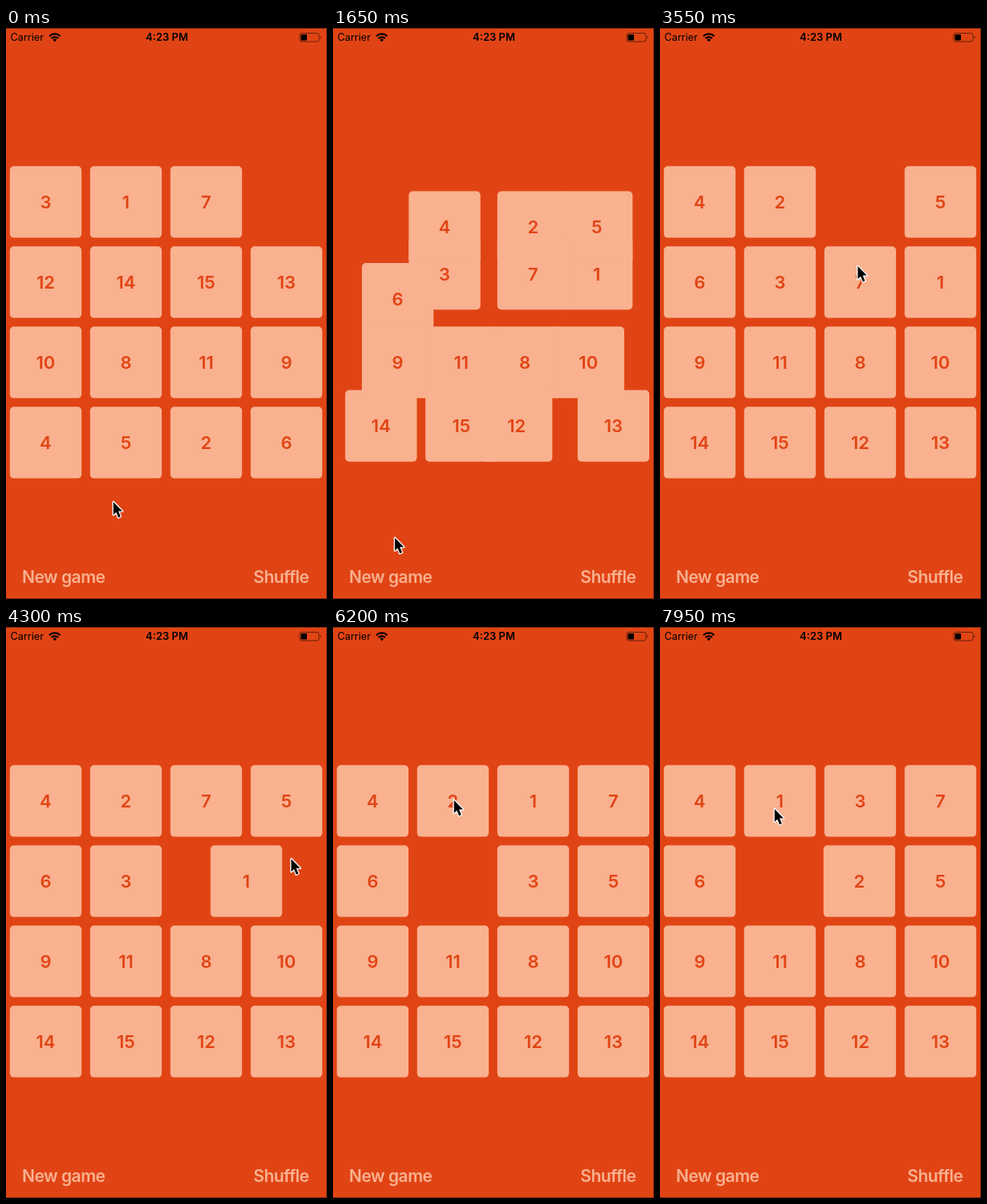
An HTML page that plays this animation: 400 by 712 pixels, repeating every 8 s.

```html
<!DOCTYPE html>
<html lang="en">
<head>
<meta charset="utf-8">
<title>Fifteen puzzle</title>
<style>
  html, body { margin: 0; width: 100%; height: 100%; overflow: hidden; background: #e14414; }
  svg { display: block; width: 100vw; height: 100vh; }
  text { font-family: Inter, Roboto, sans-serif; font-optical-sizing: none; }
  .tile rect { fill: #f9b190; }
  .tile text { font-size: 22px; font-weight: 600; fill: #e14414; text-anchor: middle; }
  .button { font-size: 21px; font-weight: 600; letter-spacing: -.5px; fill: #f9b190; }
  .status { font-size: 12.7px; }
  .clock { font-size: 13px; font-weight: 600; text-anchor: middle; }
  .end { text-anchor: end; }
</style>
</head>
<body>
<svg viewBox="0 0 400 712" preserveAspectRatio="none">
  <rect width="400" height="712" fill="#e14414"/>

  <text class="status" x="5.5" y="16.3">Carrier</text>
  <g fill="none" stroke="#000" stroke-width="2.2">
    <path d="M54 10.2a9.8 9.8 0 0 1 13.6 0"/>
    <path d="M56.6 13a6 6 0 0 1 8.4 0"/>
  </g>
  <path d="M60.8 17.2l-2.3-2.5a3.3 3.3 0 0 1 4.6 0z"/>
  <text class="clock" x="200.5" y="16.3">4:23 PM</text>
  <rect x="366" y="6.5" width="24" height="10.5" rx="2.6" fill="none" stroke="#000" stroke-opacity=".55"/>
  <rect x="367.5" y="8" width="7.5" height="7.5" rx="1"/>
  <path d="M391.5 10v3.6a2 2 0 0 0 0-3.6z" fill-opacity=".6"/>

  <g id="board"></g>

  <text class="button" id="newGame" x="20" y="692">New game</text>
  <text class="button end" x="377.5" y="692">Shuffle</text>

  <path d="M0 .5H399.5V711.5H0" fill="none" stroke="#7d2a10"/>
  <path id="cursor" d="M.8 1V17L4.3 13.7 7.1 20.4 9.8 19.1 7 12.5H12Z" stroke="#fff" stroke-width="2.6" stroke-linejoin="round" paint-order="stroke fill"/>
</svg>
<script>
const LOOP = 8000, STEP = 50, SLIDE = 250;
const PRESS = 1290, RELEASE = 1420, DEAL = 1450;
const SETTLE = 125, LINGER = 100;   // cursor rest before and after a stop
const PITCH = 100, SIZE = 89.3, LEFT = 4.8, TOP = 172.3;

// 0 is the gap
const before = "3 1 7 0 12 14 15 13 10 8 11 9 4 5 2 6".split(" ").map(Number);
const after = "0 4 2 5 6 3 7 1 9 11 8 10 14 15 12 13".split(" ").map(Number);

// [time, x, y]; a click slides the tile under it into the gap
const clicks = [
  [2700, 131, 198], [3190, 231, 208], [3700, 246, 298], [4175, 355, 291],
  [4620, 345, 215], [5050, 246, 215], [5500, 220, 291], [5870, 150, 300],
  [6240, 150, 215], [6625, 259, 215], [7100, 248, 310], [7715, 149, 308]
];
const pauses = [[0, 133, 590], [1320, 70, 685], [6975, 248, 309], [LOOP, 142, 226]];
const stops = [...clicks, ...pauses].sort((a, b) => a[0] - b[0]);

const ease = p => {
  p = Math.min(1, Math.max(0, p));
  return p * p * (3 - 2 * p);
};
const mix = (a, b, p) => a + (b - a) * p;
const column = i => LEFT + i % 4 * PITCH;
const row = i => TOP + Math.floor(i / 4) * PITCH;
const cellAt = (x, y) => Math.floor((x - LEFT) / PITCH) + 4 * Math.floor((y - TOP) / PITCH);
const place = (el, x, y) => el.setAttribute("transform", `translate(${x} ${y})`);

const board = document.getElementById("board");
const cursor = document.getElementById("cursor");
const newGame = document.getElementById("newGame");

// Each tile holds a list of slides: { start, from, to }
const tiles = [];
for (let n = 1; n <= 15; n++) {
  board.insertAdjacentHTML("beforeend",
    `<g class="tile"><rect width="${SIZE}" height="${SIZE}" rx="5"/><text x="${SIZE / 2}" y="52.8">${n}</text></g>`);
  tiles[n] = {
    el: board.lastElementChild,
    slides: [{ start: DEAL, from: before.indexOf(n), to: after.indexOf(n) }]
  };
}
const cells = after.slice();
for (const [start, x, y] of clicks) {
  const from = cellAt(x, y), to = cells.indexOf(0), n = cells[from];
  cells[to] = n;
  cells[from] = 0;
  tiles[n].slides.push({ start, from, to });
}

function drawTile({ el, slides }, t) {
  const { start, from, to } = slides.filter(s => s.start <= t).pop() || slides[0];
  const p = ease((t - start) / SLIDE);
  place(el, mix(column(from), column(to), p), mix(row(from), row(to), p));
}

function drawCursor(t) {
  const i = Math.max(1, stops.findIndex(s => s[0] > t));
  const [t0, x0, y0] = stops[i - 1], [t1, x1, y1] = stops[i];
  const leave = t0 + LINGER, arrive = t1 - SETTLE;
  const p = ease((t - leave) / (arrive - leave));
  place(cursor, mix(x0, x1, p), mix(y0, y1, p));
}

function draw(t) {
  tiles.forEach(tile => drawTile(tile, t));
  drawCursor(t);
  newGame.setAttribute("opacity", t < PRESS ? 1 : mix(.2, 1, ease((t - RELEASE) / SLIDE)));
}

const begin = performance.now();
function frame() {
  const t = (performance.now() - begin) % LOOP;
  draw(Math.floor(t / STEP) * STEP);
  requestAnimationFrame(frame);
}
frame();
</script>
</body>
</html>
```
